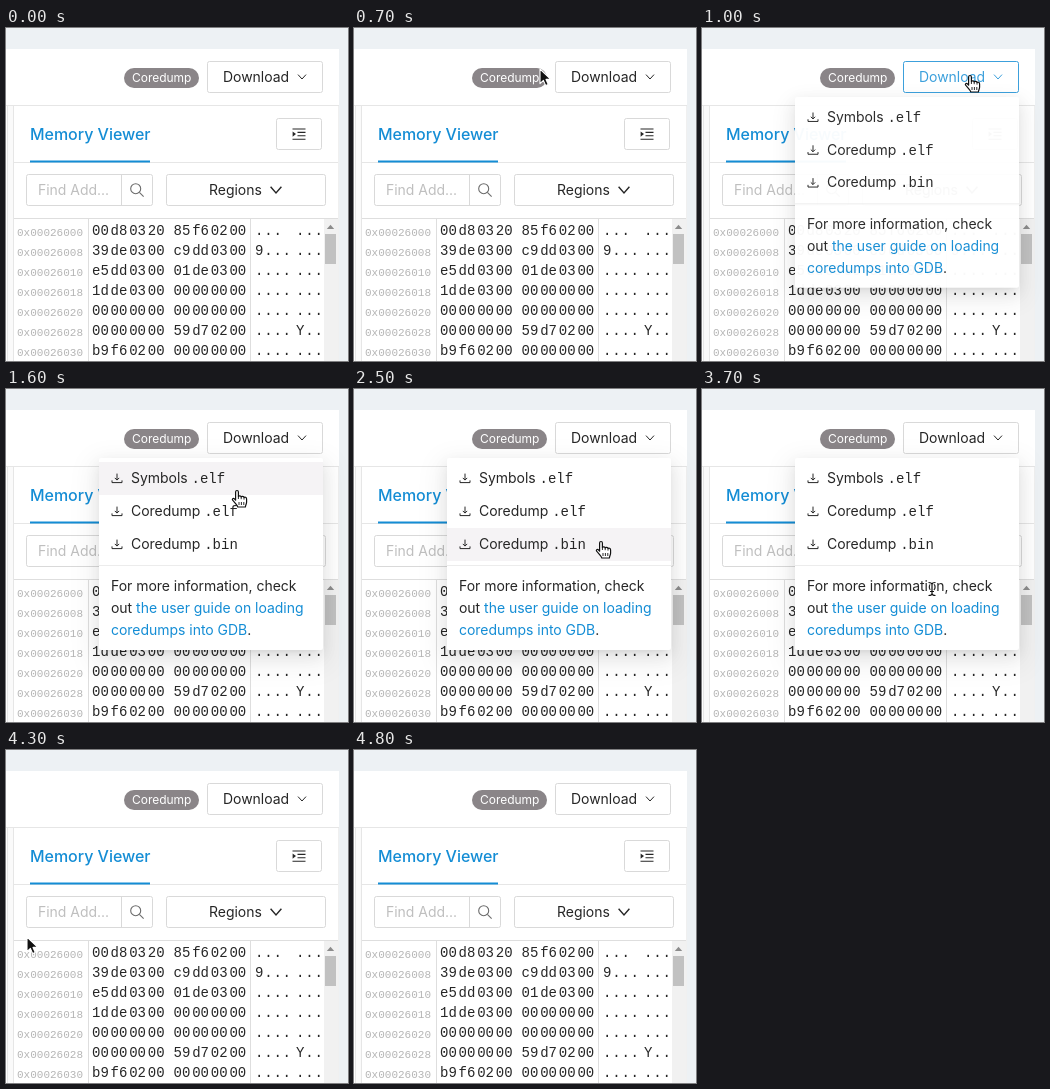
Recreate the animation shown at these times as an HTML page. Size 342 px wide and 333 px high, loop 5100 ms.

```html
<!DOCTYPE html>
<html lang="en">
<head>
<meta charset="utf-8">
<title>Memory Viewer</title>
<style>
  html, body { margin: 0; width: 100%; height: 100%; overflow: hidden; background: #edf1f4; }
  svg { display: block; }
  text { font: 14px Inter, sans-serif; letter-spacing: -.03px; fill: #262626; white-space: pre; }
  .mono { font-family: "Liberation Mono", monospace; letter-spacing: 0; }
  .addr { font-size: 11px; fill: #b5b5b5; }
  .title { font-size: 16px; font-weight: 500; fill: #148dd5; }
  .tag { font-size: 12px; fill: #fff; }
  .hint { fill: #bfbfbf; }
  .link { fill: #148dd5; }
  .box { fill: #fff; stroke: #d9d9d9; }
  .rule { fill: #e6e6e6; }
  .line { fill: none; stroke: #262626; stroke-width: 1.1; }
  .lens { stroke: #6b6b6b; }
</style>
</head>
<body>
<svg width="342" height="333" viewBox="0 0 342 333">
  <defs>
    <filter id="soft3" x="-50%" y="-50%" width="200%" height="200%"><feGaussianBlur stdDeviation="3"/></filter>
    <filter id="soft8" x="-50%" y="-50%" width="200%" height="200%"><feGaussianBlur stdDeviation="8"/></filter>
    <filter id="soft14" x="-50%" y="-50%" width="200%" height="200%"><feGaussianBlur stdDeviation="14"/></filter>
    <path id="save" class="line" style="stroke-width:1" d="M6 .6V7M3.8 4.9L6 7.1L8.2 4.9M1 7.4V9.6H11V7.4"/>
  </defs>

  <!-- page -->
  <rect y="21" width="333" height="312" fill="#fff"/>
  <rect y="77" width="333" height="1" class="rule"/>
  <rect x="2" y="78" width="5" height="255" fill="#fafafa"/>
  <rect x="1" y="78" width="1" height="255" class="rule"/>
  <rect x="7" y="78" width="1" height="255" class="rule"/>
  <rect x="8" y="134" width="325" height="1" class="rule"/>

  <!-- header -->
  <rect x="118" y="40" width="75" height="20" rx="10" fill="#8a8588"/>
  <text x="126" y="54" class="tag">Coredump</text>
  <rect id="button" x="201.5" y="33.5" width="115" height="31" rx="2" class="box"/>
  <text id="label" x="217" y="54">Download</text>
  <path id="caret" d="M292 46.6L296 51L300 46.6" class="line" style="stroke-width:1"/>

  <!-- tab -->
  <text x="24" y="112" class="title">Memory Viewer</text>
  <rect x="24" y="132.5" width="120" height="2" fill="#148dd5"/>
  <rect x="270.5" y="90.5" width="45" height="31" rx="2" class="box"/>
  <path d="M286.5 101H299.5M291.5 104.4H299.5M291.5 107.8H299.5M286.5 111.2H299.5" class="line"/>
  <path d="M286.6 103.4L290 106.1L286.6 108.8Z" fill="#262626"/>

  <!-- tools -->
  <rect x="20.5" y="146.5" width="126" height="31" rx="2" class="box"/>
  <rect x="115" y="147" width="1" height="31" fill="#d9d9d9"/>
  <text x="32" y="167" class="hint">Find Add...</text>
  <path d="M133.4 164.4L137.6 168.6" class="line lens"/>
  <circle cx="129.7" cy="160.7" r="5" class="line lens"/>
  <rect x="160.5" y="146.5" width="159" height="31" rx="2" class="box"/>
  <text x="203" y="167">Regions</text>
  <path d="M264.6 158.8L270 165L275.4 158.8" class="line" style="stroke-width:1.4"/>

  <!-- memory table -->
  <rect x="8" y="190" width="325" height="1" fill="#dedede"/>
  <rect x="82" y="191" width="1" height="142" fill="#dedede"/>
  <rect x="244" y="191" width="1" height="142" fill="#dedede"/>
  <g id="table"></g>
  <rect x="318" y="191" width="14" height="142" fill="#f1f1f1"/>
  <path d="M320.8 201L324.5 196.8L328.2 201Z" fill="#8c8c8c"/>
  <rect x="319" y="206" width="11" height="30" fill="#c1c1c1"/>
  <rect x="332" y="78" width="1" height="255" fill="#f0f0f0"/>

  <!-- dropdown -->
  <g id="menu">
    <rect x="85" y="70" width="240" height="208" opacity=".05" filter="url(#soft14)"/>
    <rect x="93" y="75" width="224" height="192" opacity=".08" filter="url(#soft8)"/>
    <rect x="97" y="76" width="216" height="184" opacity=".12" filter="url(#soft3)"/>
    <rect x="93" y="69" width="224" height="192" rx="2" fill="#fff"/>
    <rect id="row" x="93" width="224" height="33" fill="#f5f3f5"/>
    <g id="items"></g>
    <rect x="93" y="176" width="224" height="1" fill="#ececec"/>
    <text x="105" y="202">For more information, check</text>
    <text x="105" y="224">out <tspan class="link">the user guide on loading</tspan></text>
    <text x="105" y="246"><tspan class="link">coredumps into GDB</tspan>.</text>
  </g>

  <!-- pointers, each with its hot spot at 0,0 -->
  <g id="arrow">
    <path d="M0 0V14.6L3.4 11.4L5.7 16.6L8.3 15.5L6 10.4H10.8Z" fill="#111" stroke="#fff" stroke-width="1.1" stroke-linejoin="round"/>
  </g>
  <g id="hand">
    <path d="M-1.4 10.2V2C-1.4 0 1.4 0 1.4 2V6.6C1.9 5.4 4 5.6 4.2 6.9C4.8 6 6.8 6.2 7 7.5C7.7 6.7 9.6 7.1 9.6 8.9V12C9.6 14 8.6 14.8 8.4 17H.8C.4 15.2-2.1 12.8-4.2 10.4C-5.4 8.9-3.8 7.9-2.6 8.8Z" fill="#fff" stroke="#111" stroke-width="1.2" stroke-linejoin="round"/>
    <path d="M1.4 6.6V9M4.2 7V9.2M7 7.6V9.6M2 12V15M4.4 12V15M6.8 12V15" fill="none" stroke="#111" stroke-width=".9"/>
  </g>
  <g id="beam" fill="none">
    <path id="stem" d="M-3.5-6.5Q0-6.5 0-4.5Q0-6.5 3.5-6.5M0-4.5V4.5M-3.5 6.5Q0 6.5 0 4.5Q0 6.5 3.5 6.5M-2 2.5H2" stroke="#fff" stroke-width="3"/>
    <path d="M-3.5-6.5Q0-6.5 0-4.5Q0-6.5 3.5-6.5M0-4.5V4.5M-3.5 6.5Q0 6.5 0 4.5Q0 6.5 3.5 6.5M-2 2.5H2" stroke="#111" stroke-width="1.2"/>
  </g>
</svg>
<script>
const LOOP = 5100;
const $ = id => document.getElementById(id);

function addText(parent, x, y, str, cls = "") {
  const el = document.createElementNS("http://www.w3.org/2000/svg", "text");
  el.setAttribute("x", x);
  el.setAttribute("y", y);
  el.setAttribute("class", cls);
  el.textContent = str;
  parent.append(el);
  return el;
}

const memory = [
  "00d8032085f60200", "39de0300c9dd0300", "e5dd030001de0300", "1dde030000000000",
  "0000000000000000", "0000000059d70200", "b9f6020000000000"
];

memory.forEach((hex, i) => {
  const y = 207 + 20 * i;
  const address = "0x" + (0x26000 + 8 * i).toString(16).padStart(8, "0");
  addText($("table"), 11, y + .5, address, "mono addr");
  hex.match(/../g).forEach((byte, k) => {
    const group = k >> 2;
    const code = parseInt(byte, 16);
    const glyph = code >= 32 && code < 127 ? String.fromCharCode(code) : ".";
    addText($("table"), 86 + 18.6 * k + 7.2 * group, y, byte, "mono");
    addText($("table"), 249 + 9.2 * k + 4.2 * group, y, glyph, "mono");
  });
});

[["Symbols", ".elf"], ["Coredump", ".elf"], ["Coredump", ".bin"]].forEach(([name, ext], i) => {
  const y = 94 + 33 * i;
  const label = addText($("items"), 125, y, name + " ");
  const code = document.createElementNS("http://www.w3.org/2000/svg", "tspan");
  code.setAttribute("class", "mono");
  code.textContent = ext;
  label.append(code);
  $("items").insertAdjacentHTML("beforeend", `<use href="#save" x="105" y="${y - 10}"/>`);
});

// Each key holds until the next one: time, then values.
const pointerKeys = [
  [0, ""], [600, "arrow", 112, 34], [700, "arrow", 186, 41], [800, "hand", 250, 46],
  [900, "hand", 269, 47], [1000, "hand", 268, 47], [1400, "hand", 263, 56],
  [1500, "hand", 247, 80], [1600, "hand", 231, 101], [1700, "hand", 230, 102],
  [2000, "hand", 239, 110], [2100, "hand", 250, 119], [2300, "hand", 250, 131],
  [2500, "hand", 247, 152], [3100, "hand", 248, 157], [3200, "hand", 245, 169],
  [3300, "beam", 238, 191], [3400, "beam", 234, 200], [3700, "beam", 230, 200],
  [3800, "beam", 165, 198], [3900, "arrow", 84, 193], [4000, "arrow", 45, 189],
  [4100, "arrow", 26, 187], [4200, "arrow", 21, 187], [4500, "arrow", 18, 155],
  [4600, "arrow", 48, 92], [4700, "arrow", 104, 21], [4800, ""]
];
const menuKeys = [[0, 0], [900, .34], [1000, .97], [1400, 1], [4100, .985], [4200, .75], [4300, 0]];
const hoverKeys = [[0, 0], [800, .6], [900, 1], [1500, .4], [1600, 0]];

const held = (keys, t) => keys.findLast(key => key[0] <= t).slice(1);

const mix = (from, to, p) =>
  `rgb(${from.map((c, i) => Math.round(c + (to[i] - c) * p)).join()})`;

function draw(t) {
  const [kind, x, y] = held(pointerKeys, t);
  for (const id of ["arrow", "hand", "beam"]) {
    $(id).style.display = id === kind ? "" : "none";
  }
  if (kind) $(kind).setAttribute("transform", `translate(${x} ${y})`);

  const [open] = held(menuKeys, t);
  const scale = .8 + .2 * open;
  $("menu").style.display = open ? "" : "none";
  $("menu").setAttribute("opacity", open);
  $("menu").setAttribute("transform", `translate(0 ${69 * (1 - scale)}) scale(1 ${scale})`);

  const row = Math.floor((y - 73) / 33);
  const active = kind === "hand" && open === 1 && row >= 0 && row < 3;
  $("row").style.display = active ? "" : "none";
  if (active) $("row").setAttribute("y", 73 + 33 * row);

  const [hover] = held(hoverKeys, t);
  const blue = [60, 160, 220];
  const ink = mix([38, 38, 38], blue, hover);
  $("label").style.fill = ink;
  $("caret").style.stroke = ink;
  $("button").style.stroke = mix([217, 217, 217], blue, hover);
}

const start = performance.now();
function tick() {
  draw((performance.now() - start) % LOOP);
  requestAnimationFrame(tick);
}
tick();
</script>
</body>
</html>
```
